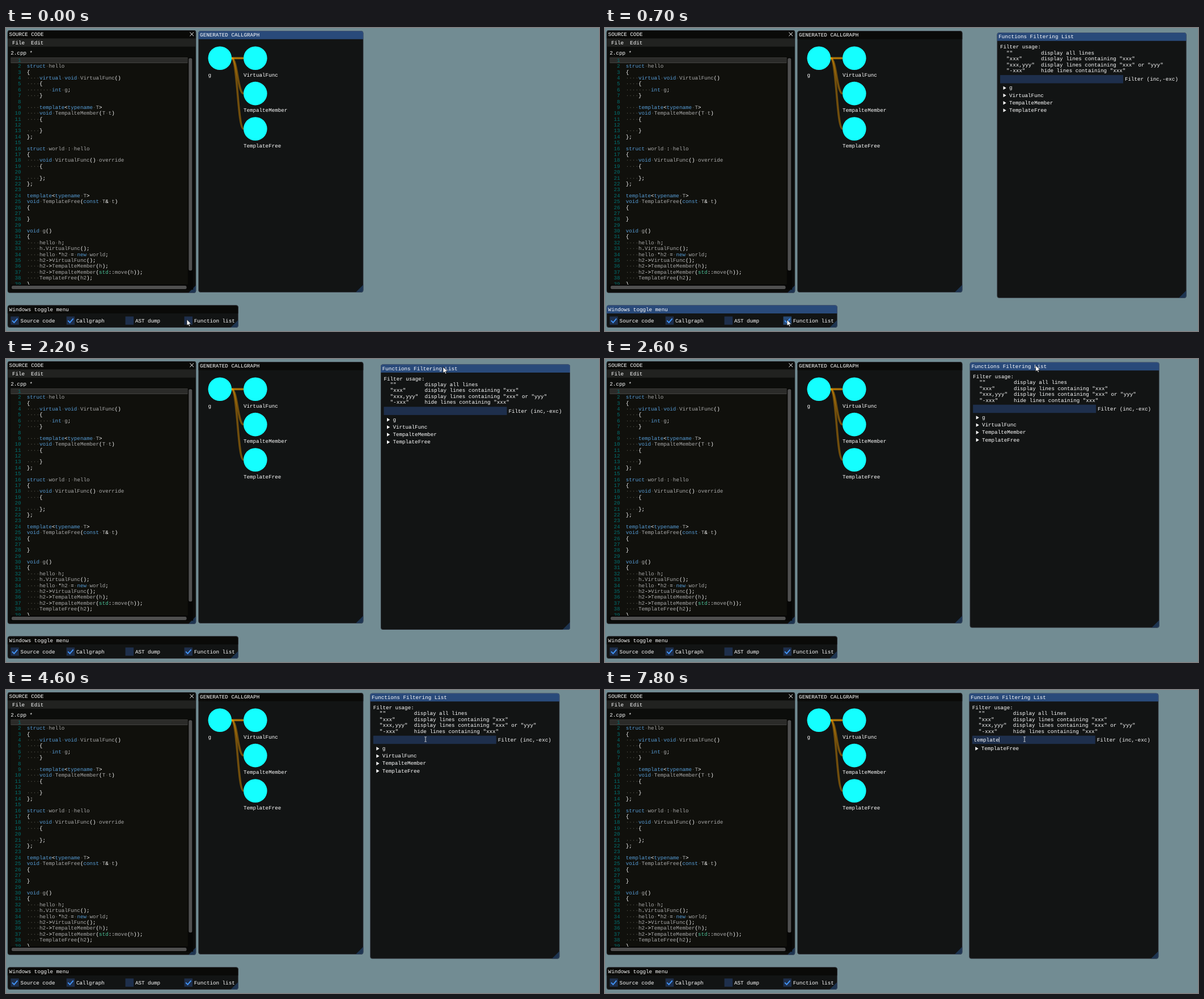
Animation of 1046 by 535 pixels, one loop 8000 ms. Source, as an HTML page:

```html
<!DOCTYPE html>
<html lang="en">
<head>
<meta charset="utf-8">
<title>Callgraph viewer</title>
<style>
html, body { margin: 0; width: 100%; height: 100%; overflow: hidden; background: #728c93; }
#stage { display: block; width: 100vw; height: 100vh; }
text {
  font: 9.236px "Liberation Mono", "Courier New", monospace;
  fill: #fff; white-space: pre; text-rendering: geometricPrecision;
}
.dot { fill: #56564e; }
.key { fill: #569cd6; }
.id { fill: #aaa; }
.known { fill: #4dc69b; }
.num { fill: #007070; }
.frame { fill: #1e2f4c; }
.mark { fill: none; stroke: #4296fa; stroke-width: 1.9; }
.edge { fill: none; stroke: #ffa500; stroke-width: 3.6; stroke-opacity: .4; }
</style>
</head>
<body>
<svg id="stage" viewBox="0 0 1046 535" preserveAspectRatio="none"></svg>
<script>
const LOOP = 8000;
const CHAR = 5.541, ROW = 10.39, BASE = 8.1, BAR = 14.5;
const ACTIVE = '#294a7a', IDLE = '#0a0a08', BODY = '#121414';
const stage = document.getElementById('stage');

function add(parent, tag, attrs, content) {
  const el = document.createElementNS('http://www.w3.org/2000/svg', tag);
  for (const k in attrs) el.setAttribute(k, attrs[k]);
  if (content !== undefined) el.textContent = content;
  parent.appendChild(el);
  return el;
}
const box = (p, x, y, width, height, fill, rx = 0) =>
  add(p, 'rect', { x, y, width, height, fill, rx });
// y is the top of the text row
const label = (p, x, y, str, cls = '') =>
  add(p, 'text', { x, y: y + BASE, class: cls }, str);
const show = (el, on) => el.setAttribute('visibility', on ? 'visible' : 'hidden');
const move = (el, x, y) => el.setAttribute('transform', `translate(${x} ${y})`);

function makeWindow(x, y, w, h, title, body = BODY) {
  const g = add(stage, 'g', {});
  move(g, x, y);
  box(g, 0, 0, w, h, body, 4);
  const bar = add(g, 'path', { d: `M0 ${BAR}V4Q0 0 4 0H${w - 4}Q${w} 0 ${w} 4V${BAR}Z`, fill: IDLE });
  add(g, 'path', { d: `M${w} ${h - 13.5}V${h - 4}Q${w} ${h} ${w - 4} ${h}H${w - 13.5}Z`, fill: '#1d3450' });
  add(g, 'rect', { x: .35, y: .35, width: w - .7, height: h - .7, rx: 4, fill: 'none',
    stroke: '#6e6e80', 'stroke-opacity': .4, 'stroke-width': .7 });
  label(g, 2.8, 2.1, title);
  return { g, bar };
}

// Source code window
const CODE = `
struct hello
{
    virtual void VirtualFunc()
    {
        int g;
    }

    template<typename T>
    void TempalteMember(T t)
    {

    }
};

struct world : hello
{
    void VirtualFunc() override
    {

    };
};

template<typename T>
void TemplateFree(const T& t)
{

}

void g()
{
    hello h;
    h.VirtualFunc();
    hello *h2 = new world;
    h2->VirtualFunc();
    h2->TempalteMember(h);
    h2->TempalteMember(std::move(h));
    TemplateFree(h2);
}`;
const KEYS = /^(struct|virtual|void|int|template|typename|const|new)$/;

function tokenClass(tok) {
  if (tok[0] === ' ') return 'dot';
  if (KEYS.test(tok)) return 'key';
  if (tok === 'std') return 'known';
  return /\w/.test(tok) ? 'id' : '';
}

const src = makeWindow(2.8, 3.9, 332.4, 463.8, 'SOURCE CODE', '#0c0d0b').g;
add(src, 'path', { d: 'M321.6 3.7l6.6 6.6m0 -6.6l-6.6 6.6', stroke: '#fff', 'stroke-width': 1 });
box(src, .7, BAR, 331, BAR, '#212220');
label(src, 8.2, 16.6, 'File');
label(src, 41.3, 16.6, 'Edit');
label(src, 5.5, 34.6, '2.cpp *');

const editor = add(stage, 'svg', { x: 8.3, y: 51.7, width: 322, height: 410.5 });
box(editor, 0, 0, 322, 410.5, '#10100c');
const page = add(editor, 'svg', { x: 0, y: 0, width: 312.4, height: 401.2 });
add(page, 'rect', { x: .35, y: .35, width: 311.7, height: 9.6, fill: '#2b2b29', stroke: '#51514f', 'stroke-width': .7 });
CODE.split('\n').forEach((line, i) => {
  const y = i * ROW;
  label(page, 7.1, y, String(i + 1).padStart(2), 'num');
  const row = label(page, 28.5, y, '');
  for (const tok of line.match(/ +|\w+|[^\w ]+/g) || [])
    add(row, 'tspan', { class: tokenClass(tok) }, tok.replace(/ /g, '·'));
});
box(editor, 312.4, 0, 9.6, 401.2, '#070706');
box(editor, 0, 401.2, 322, 9.3, '#070706');
box(editor, 314, 1.6, 6, 375, '#4f4f4f', 2.5);
box(editor, 1.6, 403.2, 308.6, 6, '#4f4f4f', 2.5);

// Callgraph window
const graph = makeWindow(339.3, 5.2, 291, 461.6, 'GENERATED CALLGRAPH');
const NODES = [[377.3, 53.3, 'g'], [439.8, 53.3, 'VirtualFunc'],
  [439.8, 115.6, 'TempalteMember'], [439.8, 178, 'TemplateFree']];
for (const [cx, cy, name] of NODES) {
  add(stage, 'circle', { cx, cy, r: 20.8, fill: '#14ffff' });
  label(stage, cx - 20.9, cy + 24.6, name);
}
for (const [, y] of NODES.slice(1))
  add(stage, 'path', { class: 'edge', d: `M398 53.3C408.5 53.3 408.5 ${y} 419 ${y}` });
add(stage, 'path', { class: 'edge', d: 'M398 53.3H419' });

// Toggle menu
const menu = makeWindow(2.8, 489.4, 406.9, 39.6, 'Windows toggle menu');
const toggles = ['Source code', 'Callgraph', 'AST dump', 'Function list'].map((name, i) => {
  const x = i ? 103.9 * i : 5.5;
  const frame = add(menu.g, 'rect', { x, y: 20, width: BAR, height: BAR, class: 'frame' });
  const mark = add(menu.g, 'path', { class: 'mark', d: `M${x + 2.6} 27.2l3.4 3.5l6 -7` });
  label(menu.g, x + 17.3, 22.1, name);
  return { frame, mark };
});
show(toggles[2].mark, false);
const listToggle = toggles[3];

// Functions window
const list = makeWindow(642.3, 5.8, 334, 468.6, 'Functions Filtering List');
list.bar.setAttribute('fill', ACTIVE);
['Filter usage:',
  '  ""         display all lines',
  '  "xxx"      display lines containing "xxx"',
  '  "xxx,yyy"  display lines containing "xxx" or "yyy"',
  '  "-xxx"     hide lines containing "xxx"'
].forEach((str, i) => label(list.g, 5.5, 20.1 + i * ROW, str));
add(list.g, 'rect', { x: 5.5, y: 74.9, width: 217, height: BAR, class: 'frame' });
label(list.g, 225.4, 77, 'Filter (inc,-exc)');
const typed = label(list.g, 8.2, 77, '');
const caret = box(list.g, 8.2, 77.4, .8, 9, '#fff');
const items = NODES.map(([, , name]) => {
  const g = add(list.g, 'g', {});
  add(g, 'path', { d: 'M11 2.3l5.2 3.2l-5.2 3.2Z', fill: '#fff' });
  label(g, 21.4, 0, name);
  return { g, key: name.toLowerCase() };
});

// Pointers
const arrow = add(stage, 'g', {});
add(arrow, 'path', { transform: 'scale(.66)', fill: '#fff', stroke: '#000', 'stroke-width': 1,
  d: 'M0 0V16.5L3.8 13L6.3 18.6L8.8 17.6L6.4 12.1H11.6Z' });
const beam = add(stage, 'path', { d: 'M738.2 82.8H739.4L740 83.3L740.6 82.8H741.8M740 83.3V90.7M738.2 91.2H739.4L740 90.7L740.6 91.2H741.8',
  fill: 'none', stroke: '#e8e8e8', 'stroke-width': .9 });

// Step tables: time, then values held until the next row
const POINTER = [[0, 319, 514.6], [300, 320, 514.8], [400, 321, 515]];
[.06, .22, .46, .7, .88, .97, 1].forEach((k, i) =>
  POINTER.push([1100 + i * 100, 321 + 486 * k, 515 - 501.4 * k]));
POINTER.push([1900, 788, 16.6], [2000, 782, 16], [2100, 776, 15], [2200, 771, 13.9],
  [2300, 766, 12.8], [2400, 762.5, 12], [2500, 761, 11.5], [2600, 759.7, 11.3],
  [2700, 757.5, 11.2], [2800, 757.5, 39.3], [3000, 750, 62], [3100, 741, 83]);
const PLACE = [[0, 691.5, 8.2], [1900, 680.5, 9.3], [2000, 672.5, 11.3], [2100, 667, 10.6],
  [2200, 661, 9.5], [2300, 656, 8.4], [2400, 651, 7.3], [2500, 647, 6.4],
  [2600, 643.6, 5.8], [2700, 642.3, 5.8]];
const TYPING = [[0, ''], [4700, 'fr'], [4900, 'fre'], [5100, 'free'], [6100, 'fre'],
  [6300, 'fr'], [6400, ''], [7100, 't'], [7200, 'te'], [7300, 'temp'], [7500, 'templ'],
  [7700, 'templat'], [7800, 'template']];
const CARET = [[0, false], [3500, true], [4600, false], [4700, true]];

function at(table, t) {
  let row = table[0];
  for (const r of table) if (r[0] <= t) row = r;
  return row.slice(1);
}

function draw(t) {
  graph.bar.setAttribute('fill', t < 600 ? ACTIVE : IDLE);
  menu.bar.setAttribute('fill', t >= 600 && t < 800 ? ACTIVE : IDLE);
  listToggle.frame.style.fill =
    t < 600 || t >= 1100 ? '' : t < 700 ? '#326bad' : '#274a76';
  show(listToggle.mark, t >= 700);
  list.g.style.display = t >= 700 ? '' : 'none';
  move(list.g, ...at(PLACE, t));

  const [word] = at(TYPING, t);
  typed.textContent = word;
  caret.setAttribute('x', 8.2 + word.length * CHAR);
  show(caret, at(CARET, t)[0]);
  let n = 0;
  for (const { g, key } of items) {
    const hit = key.includes(word);
    g.style.display = hit ? '' : 'none';
    if (hit) move(g, 0, 92.2 + 13.16 * n++);
  }

  move(arrow, ...at(POINTER, t));
  show(arrow, t < 3200);
  show(beam, t >= 3200);
}

const start = performance.now();
function tick() {
  draw((performance.now() - start) % LOOP);
  requestAnimationFrame(tick);
}
tick();
</script>
</body>
</html>
```
